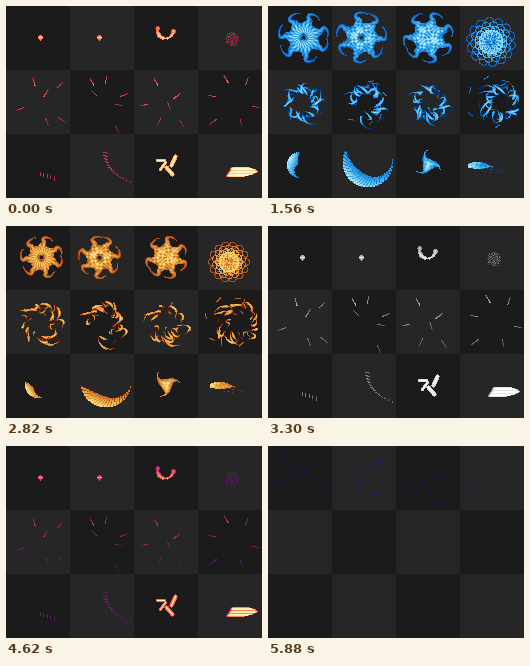
An HTML page with a canvas for the animation above (5940 ms loop, 256 by 192 pixels).

```html
<!DOCTYPE html>
<html>
<head>
<meta charset="utf-8">
<style>
html, body { margin: 0; width: 100%; height: 100%; overflow: hidden; background: #1b1b1b; }
canvas { display: block; width: 100vw; height: 100vh; image-rendering: pixelated; }
</style>
</head>
<body>
<canvas id="stage" width="256" height="192"></canvas>
<script>
const W = 256, H = 192, CELL = 64, POSES = 11, STEP = 60, TAU = Math.PI * 2;
const { sin, cos, abs, max, min, floor, ceil, hypot, atan2, PI } = Math;
const ctx = document.getElementById('stage').getContext('2d');

// Colour ramps, cold to hot
const ramps = [
  '4a1230 c8304c f07a50 ffd080 fff6d0',
  '1c0a70 4a10e0 9a44ff f0a0f0 ffffff',
  '06205a 0a58b8 2aa0e8 9ae0f8 ffffff',
  '063a28 0c803c 34b84c 98e868 f4ffc0',
  '3a1008 a0401a e09030 f8d870 ffffff',
  '3c3c3c 777777 b4b4b4 e4e4e4 ffffff',
  '0a2a3a 107080 20b8a8 90f0c8 ffffff',
  '200a3c 6a1a70 d03860 f88850 fff0b0',
  '1c0850 4008a0 9010d8 e850e0 ffd0ff'
].map(r => r.split(' ').map(h => [0, 2, 4].map(i => parseInt(h.substr(i, 2), 16))));

// Start points of the six sparks in each cell of the middle row
const sparks = [
  [28, 12, 54, 15, 40, 23, 14, 39, 41, 52, 56, 50],
  [22, 12, 36, 10, 24, 23, 54, 25, 49, 35, 47, 59],
  [22, 12, 43, 26, 10, 35, 35, 36, 25, 52, 48, 54],
  [28, 9, 49, 11, 14, 26, 58, 37, 15, 52, 43, 53]
];

const hash = n => { const v = sin(n * 127.1) * 43758.5453; return v - floor(v); };
const mix = (a, b, t) => a + (b - a) * t;

let buf, ox, oy;

function plot(x, y, v) {
  if (x < 0 || y < 0 || x >= CELL || y >= CELL) return;
  const i = (oy + y) * W + ox + x;
  buf[i] = max(buf[i], v);
}

function dab(x, y, r, v) {
  if (r < 1) return plot(floor(x), floor(y), v);
  for (let j = floor(y - r); j <= ceil(y + r); j++)
    for (let i = floor(x - r); i <= ceil(x + r); i++) {
      const d = hypot(i - x, j - y) / r;
      if (d <= 1) plot(i, j, v * (1 - d * .5));
    }
}

function line(x0, y0, x1, y1, r, v0, v1 = v0) {
  const n = ceil(hypot(x1 - x0, y1 - y0) * 2);
  for (let i = 0; i <= n; i++)
    dab(mix(x0, x1, i / n), mix(y0, y1, i / n), r, mix(v0, v1, i / n));
}

function arc(x, y, r, a0, a1, v) {
  for (let a = a0; a < a1; a += .6 / r) plot(floor(x + r * cos(a)), floor(y + r * sin(a)), v);
}

// Tapering arms around a centre
function star(x, y, n, R, spin, curl, fat, v) {
  for (let k = 0; k < n; k++)
    for (let s = 0; s <= 1; s += .4 / R) {
      const a = spin + k * TAU / n + curl * s * s * s;
      const r = R * s;
      dab(x + r * cos(a), y + r * sin(a), max(.9, fat * R * (1 - s) ** 1.2), v * (1 - .45 * s));
    }
}

// Ribbed arc, thickest past its middle
function crescent(x, y, R, a0, a1, thick, v, ribs) {
  for (let a = a0, k = 0; a < a1; a += .5 / R, k++) {
    const s = (a - a0) / (a1 - a0), body = sin(PI * s ** 1.5) ** .8;
    for (let q = 0; q <= thick * body; q += .5) {
      const rib = (k + q * 1.5) % ribs < ribs * .4 ? 1 : mix(.3, .7, body);
      plot(floor(x + (R - q) * cos(a)), floor(y + (R - q) * sin(a)),
        v * mix(.5, 1, body) * (1 - .55 * q / thick) * rib);
    }
  }
}

function shade(fn) {
  for (let y = 0; y < CELL; y++)
    for (let x = 0; x < CELL; x++) buf[(oy + y) * W + ox + x] *= fn(x, y);
}

const lumps = (x, y, seed) =>
  .5 + .5 * sin(x * .9 + seed + 2 * sin(y * .55)) * sin(y * + 1 + 2 * sin(x * .5 + seed));

const mottle = (seed, amount) => shade((x, y) => 1 - amount * lumps(x, y, seed));

// Scalloped body with hooked tips
function flower(p, c) {
  const x = [35, 29, 32][c], y = 31, early = p < 5;
  if (!p) {
    if (c < 2) {
      const cx = 34 - 5 * c;
      dab(cx, y, 2.5, .7);
      line(cx, y - 2, cx, y + 3, .5, .55);
      line(cx - 2, y, cx + 2, y, .5, .8);
    } else for (let a = .1; a < 3.6; a += .3)
      dab(31 + 8 * cos(a), 24 + 8 * sin(a), .9 + 1.7 * hash(a * 9), .7 + .3 * sin(a));
    return;
  }
  const R = [0, 9, 15, 20, 24, 27, 28, 28, 28, 27, 26][p];
  const n = early ? 7 : 8, spin = p * .13 + c * .4;
  const heat = early ? .92 : .68, hole = [4, 3.5, 0][c];
  for (let j = 0; j < CELL; j++)
    for (let i = 0; i < CELL; i++) {
      const d = hypot(i - x, j - y), a = atan2(j - y, i - x) - spin - .08 * sin(d * .4);
      const petal = abs(cos(n * a / 2));
      const edge = R * (early ? .62 + .22 * petal ** 3 : .5 + .38 * petal ** 2);
      if (d > edge || d < hole * .5) continue;
      const ray = c ? lumps(i, j, c + p) : .5 + .5 * sin(n * 3 * a) * sin(d * .6);
      plot(i, j, heat * mix(.45, 1, ray) * (1 - .45 * (d / edge) ** 3) * min(1, .1 + d / (hole * 1.6 + .1)));
    }
  for (let k = 0; k < n; k++) {
    const turn = hash(k + c * 7) < .5 ? -1 : 1;
    for (let s = 0; s <= 1; s += .03) {
      const r = R * (.78 + .26 * sin(2.3 * s)), a = spin + k * TAU / n + turn * (.38 * s * s - .1 * sin(5 * s));
      dab(x + r * cos(a), y + r * sin(a), (early ? 1.7 : 2.6) * (1 - s) + .6, heat * (.65 - .35 * s));
    }
  }
}

function rosette(p) {
  if (!p) {
    for (let i = 0; i < 80; i++) {
      const a = i * 2.4, r = 7 * (i / 80) ** .5;
      plot(floor(34 + r * cos(a)), floor(33 + r * sin(a)), .08 + .2 * hash(i));
    }
    return;
  }
  const R = min(27, 8 + p * 4.2), x = 31, y = 36, early = p < 5;
  for (let k = 0; k < 14; k++) {
    const a = k * TAU / 14 + p * .15;
    for (let ring = 0; ring < 4; ring++) {
      const d = R * (.82 - ring * .17), r = R * .17, b = a + ring * .22;
      arc(x + d * cos(b), y + d * sin(b), r, a - 1.6, a + (early ? 2.4 : .6 + hash(k)),
        (early ? .3 : .22) + ring * .14);
    }
  }
  for (let i = 0; i < 110; i++) {
    const a = i * 2.4, r = R * .5 * (i / 110) ** .5;
    dab(x + r * cos(a), y + r * sin(a), 1.4, (early ? .4 : .3) + .5 * hash(i + p));
  }
}

// Sparks fly in and wriggle into curls
function curls(p, c) {
  const cx = c == 3 ? 42 : 34, cy = 33, now = p / 10;
  const pts = sparks[c];
  for (let k = 0; k < 12; k += 2) {
    const dx = pts[k] - cx, dy = pts[k + 1] - cy, d = hypot(dx, dy), a = atan2(dy, dx);
    if (!p) {
      const v = .5 - .03 * k;
      line(cx + dx * (1 - 4 / d), cy + dy * (1 - 4 / d), cx + dx * (1 + 4 / d), cy + dy * (1 + 4 / d),
        .5, v, v * .4);
      continue;
    }
    for (const dir of [1, -1]) {
      const len = min(.32, now * .8);
      for (let s = 0; s <= 1; s += .006) {
        const u = now - len * (1 - s);
        const r = mix(d, 17, min(1, u * 4)) - 13 * u + 3.5 * sin(34 * u + k + dir);
        const b = a + dir * (.25 + 1.1 * u + .4 * sin(24 * u + k));
        const v = (.4 + .4 * sin(13 * s + k + dir)) * sin(PI * s) ** .5;
        dab(cx + r * cos(b), cy + r * sin(b), v > .6 && p < 5 ? 1.2 : .6, v);
      }
    }
    if (c == 3 || c == 1 && p > 3) {
      const b = a + p * .25, r = c == 3 ? 24 : 21;
      line(32 + r * cos(b), 32 + r * sin(b), 32 + (r + 2) * cos(b + .2), 32 + (r + 2) * sin(b + .2), .8, .35);
    }
  }
}

function slash(p, big) {
  if (!p) {
    const n = big ? 13 : 5;
    for (let i = 0; i < n; i++) {
      const s = i / (n - 1);
      const x = big ? 33 + 5 * s + 22 * s * s : 34 + 14 * s;
      const y = big ? 18 + 42 * s - 13 * s * s : 38 + 4 * s;
      const w = big ? 4 * (1 - s) : 0, h = big ? 1 : 3 + s;
      line(x, y, x + w, y + h, .5, .1 + .2 * sin(PI * min(1, s + .2)), .25);
    }
    return;
  }
  const k = min(p, 6) - 1;
  const from = big ? [.5, .4, .2, -.1, -1.2, -1.4] : [.6, .9, 1.3, 1.7, -.4, -.6];
  const to = big ? [1.9, 2.5, 3, 3.6, 3.5, 2.8] : [1.6, 2.4, 3.4, 4.7, 3.7, 2.6];
  if (big) crescent(p < 5 ? 36 : 38, p < 5 ? 28 : 33, p < 5 ? 25 : 22, from[k], to[k],
    [5, 8, 11, 13, 16, 10][k], .82, 7);
  else crescent(32, p < 5 ? 31 : 34, 12.5, from[k], to[k], [3, 4, 7, 10, 10, 7][k], p < 5 ? .85 : .62, 4);
}

function blades(p) {
  if (!p) {
    line(41, 22, 37, 31, 2.2, 1);
    line(23, 26, 30, 26, 1.6, 1);
    line(31, 28, 26, 35, 1.6, 1);
    line(32, 33, 38, 40, 2.2, 1);
    return;
  }
  const thin = p > 4;
  star(32, 30, thin ? 4 : 3, thin ? 15 : 14, p * .55 + (thin ? 1.1 : -.2), thin ? .1 : .6,
    thin ? .18 : .4, thin ? .75 : 1);
  mottle(p, .35);
}

function comet(p) {
  if (!p) {
    for (let j = 0; j < 10; j++) {
      const x = 28 + (9 - j) * .6, len = 15 + 14 * sin(PI * (j + 1) / 11);
      for (let i = 0; i < len; i++)
        plot(floor(x + i), 33 + j, (j % 3 ? 1 : .75) * min(1, .4 + 2.4 * sin(PI * i / len)));
    }
    return;
  }
  if (p < 5) {
    const x = 26 - p * 4;
    for (let i = 0; i < 25; i++) {
      const s = i / 24, h = 4 * sin(PI * (.15 + .85 * s));
      line(x + i - 2, 32 + s - h, x + i - 2, 32 + h * .6, .8, .9 - .45 * s);
    }
    for (let i = 0; i < 18; i++) plot(floor(x + 6 + 28 * hash(i)), floor(32 + 7 * hash(i + 40)), .25);
    mottle(p, .4);
    return;
  }
  const x = 20 + (p - 5) * 6;
  for (let i = 0; i < 32; i++)
    dab(x + i, 31 - 2 * i / 32, .8 + 1.3 * sin(PI * i / 32), .2 + .38 * sin(PI * i / 32));
  for (let i = 0; i < 18; i++) plot(floor(8 + 14 * hash(i + 7)), floor(27 + 8 * hash(i + 70)), .2);
}

const effects = [
  p => flower(p, 0), p => flower(p, 1), p => flower(p, 2), rosette,
  p => curls(p, 0), p => curls(p, 1), p => curls(p, 2), p => curls(p, 3),
  p => slash(p, false), p => slash(p, true), blades, comet
];

function render(p) {
  buf = new Float32Array(W * H);
  effects.forEach((draw, c) => {
    ox = c % 4 * CELL;
    oy = floor(c / 4) * CELL;
    draw(p);
    if (p < 6) return;
    const gone = [.25, .5, .72, .86, c < 3 ? .955 : .985][p - 6];
    shade((x, y) => hash(x + y * 71 + c * 997) < gone ? 0 : p > 9 ? .28 : 1 - gone * .75);
  });
  return buf;
}

const poses = Array.from({ length: POSES }, (_, p) => render(p));
const image = ctx.createImageData(W, H);

function paint(step) {
  const ramp = ramps[floor(step / POSES)], heat = poses[step % POSES];
  for (let i = 0; i < W * H; i++) {
    const x = i % W, y = floor(i / W), v = heat[i];
    const bg = (floor(x / CELL) + floor(y / CELL)) % 2 ? 38 : 27;
    const t = min(.999, v) * 4, k = floor(t);
    for (let n = 0; n < 3; n++)
      image.data[i * 4 + n] = v > .04 ? mix(ramp[k][n], ramp[k + 1][n], t - k) : bg;
    image.data[i * 4 + 3] = 255;
  }
  ctx.putImageData(image, 0, 0);
}

let shown = -1;
function tick() {
  const step = floor(performance.now() / STEP) % (POSES * ramps.length);
  if (step != shown) paint(shown = step);
  requestAnimationFrame(tick);
}
tick();
</script>
</body>
</html>
```
